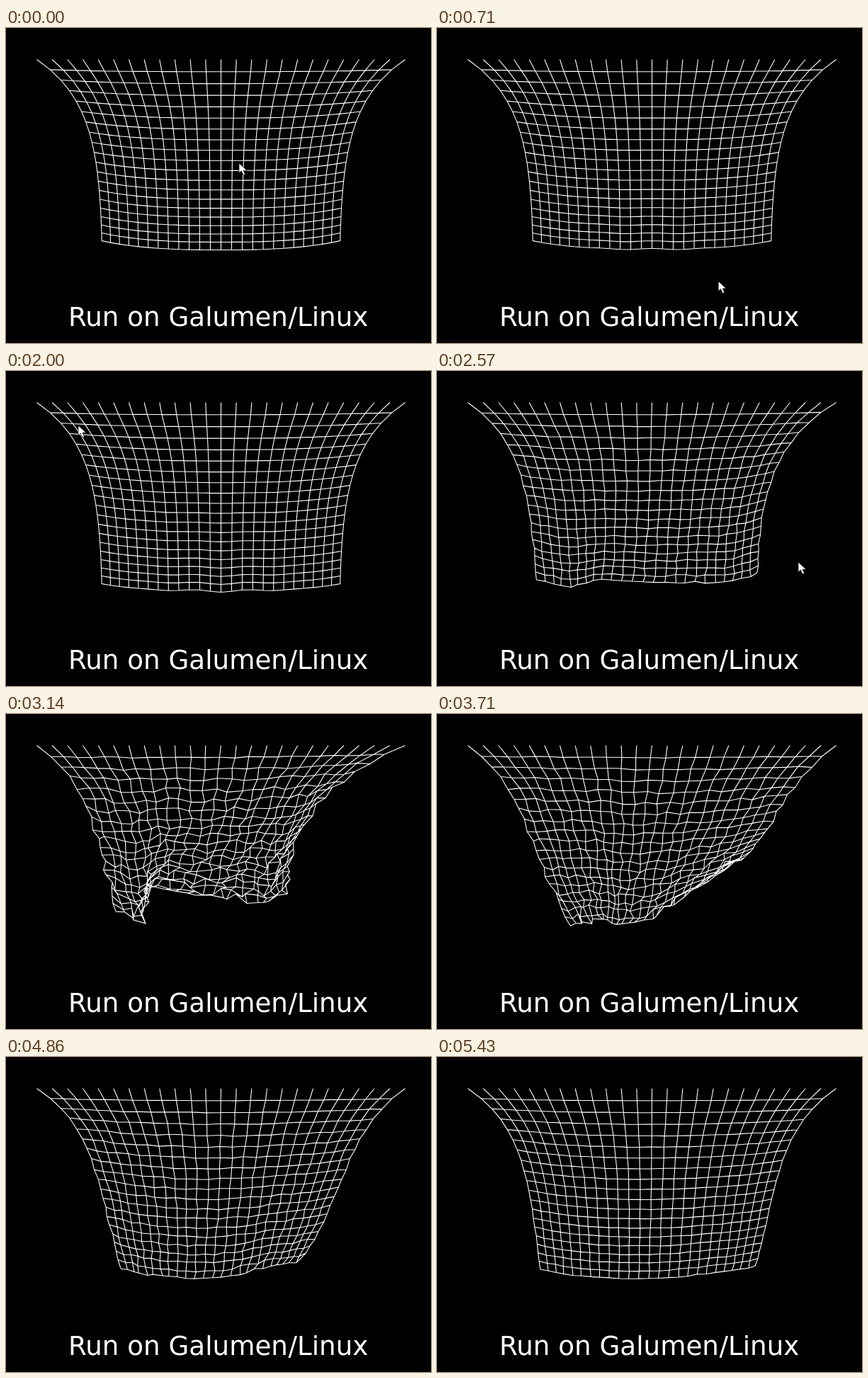
Write an HTML page with a canvas that moves like this. It is 600 px wide and 445 px high and loops after 5570 ms.

```html
<!DOCTYPE html>
<html lang="en">
<head>
<meta charset="utf-8">
<title>Cloth simulation</title>
<style>
  html, body { margin: 0; width: 100%; height: 100%; overflow: hidden; background: #000; }
  canvas, svg { position: absolute; left: 0; top: 0; width: 600px; height: 445px; }
  text { font: 37.25px "DejaVu Sans", Verdana, sans-serif; fill: #fff; }
</style>
</head>
<body>
<canvas id="cloth" width="600" height="445"></canvas>
<svg viewBox="0 0 600 445">
  <text x="88" y="421">Run on Galumen</text>
  <text x="511.4" y="421" text-anchor="end">/Linux</text>
  <path id="cursor" fill="#fff" stroke="#000" stroke-width=".7"
    d="M0 0V14L3.4 11L6 17L8.6 15.8L6.1 10.2H11Z"/>
</svg>
<script>
const LOOP = 5570, STEP = 1000 / 7, LAST = 38;
const COLS = 24, ROWS = 19;
const ctx = document.getElementById('cloth').getContext('2d');
const cursor = document.getElementById('cursor');
const mix = (a, b, p) => a + (b - a) * p;

// The cloth at rest, hanging from its pinned top row; s and v run from 0 to 1.
function rest(s, v) {
  const u = 2 * s - 1, r = v * ROWS;
  const half = r ? 167 + 93 * Math.exp(-r / 4.4) : 260;
  const k = 0.07 * (1 - Math.exp(-r));
  const drop = 13 * (1 - Math.exp(-r / 4)) * Math.abs(u) ** 2.5;
  return [303 + half * (u * (1 + k) - k * u ** 3), 44 + 17.4 * r - 0.1706 * r * r - drop];
}

// Catmull-Rom through evenly spaced values, ends extended straight.
function spline(vals, s) {
  const n = vals.length - 1, t = s * n, i = Math.min(n - 1, Math.floor(t)), f = t - i;
  const b = vals[i], c = vals[i + 1];
  const a = i ? vals[i - 1] : 2 * b - c;
  const d = i + 2 <= n ? vals[i + 2] : 2 * c - b;
  return b + 0.5 * f * (c - a + f * (2 * a - 5 * b + 4 * c - d + f * (3 * (b - c) + d - a)));
}

// Parabola from 0 through the middle value to the end value.
const bow = (mid, end, v) => v * (4 * mid - end) + v * v * (2 * end - 4 * mid);

function jitter(c, r, seed) {
  const n = Math.sin(c * 12.9898 + r * 78.233 + seed * 37.719) * 43758.5453;
  return 2 * (n - Math.floor(n)) - 1;
}

function grid(place) {
  const out = [];
  for (let r = 0; r <= ROWS; r++)
    for (let c = 0; c <= COLS; c++) out.push(place(c / COLS, r / ROWS, c, r));
  return out;
}

// A soft wave around the middle column.
const ripple = (amp, lift) => grid((s, v) => {
  const [x, y] = rest(s, v), u = 2 * s - 1;
  return [x, y + v * v * (amp * Math.cos(u * 14) * Math.exp(-6 * u * u) - lift * (1 - u * u))];
});

// Pulls the hem and the middle of both sides to given points and spreads the shift
// inwards: `reach` sets how fast it fades upwards, `rough` how much the net crumples.
function drag({ left, right, hem, reach, rough }) {
  const axes = [0, 1].map(i => {
    const off = (p, s, v) => p[i] - rest(s, v)[i];
    return {
      hem: hem.map((p, j) => off(p, j / (hem.length - 1), 1)),
      left: off(left, 0, 0.5),
      right: off(right, 1, 0.5)
    };
  });
  return grid((s, v, c, r) => {
    const rise = v ** reach, wl = (1 - s) ** 3, wr = s ** 3;
    const crumple = rough * Math.min(1, r / 3) * (0.5 + 0.5 * v * v);
    return rest(s, v).map((p, i) => {
      const a = axes[i], first = a.hem[0], last = a.hem[a.hem.length - 1];
      return p + rise * spline(a.hem, s)
        + wl * (bow(a.left, first, v) - rise * first)
        + wr * (bow(a.right, last, v) - rise * last)
        + jitter(c, r, i + 1) * crumple;
    });
  });
}

const still = grid(rest);

const swept = drag({
  left: [131, 179], right: [419, 157], reach: 1.8, rough: 6,
  hem: [[155, 273], [192, 291], [203, 246], [258, 256], [315, 256], [365, 270], [400, 243]]
});
const falling = drag({
  left: [137, 184], right: [464, 164], reach: 1, rough: 4,
  hem: [[188, 295], [230, 292], [272, 297], [335, 268], [410, 210]]
});
const settling = drag({
  left: [135, 176], right: [465, 175], reach: 1.5, rough: 3,
  hem: [[178, 295], [222, 309], [285, 312], [345, 290], [382, 279]]
});

const linear = p => p;
const smooth = p => p * p * (3 - 2 * p);

// [step, pose, easing towards this pose]; the loop restarts just before full rest.
const poses = [
  [0, still],
  [9, ripple(-2, 2), linear],
  [14, ripple(2, 3), linear],
  [16, still, linear],
  [22, swept, smooth],
  [26, falling, linear],
  [30, settling, linear],
  [40.6, still, linear]
];

// Pointer trails: [step, x, y]; hidden outside them.
const trails = [
  [[0, 329, 191], [4, 420, 402], [9, 306, 181], [14, 102, 77], [16, 68, 62],
   [18, 510, 270], [20, 430, 402]],
  [[29, 392, 389], [31, 380, 375]]
];

function span(keys, n) {
  let i = 1;
  while (i < keys.length - 1 && keys[i][0] < n) i++;
  const a = keys[i - 1], b = keys[i];
  return [a, b, (n - a[0]) / (b[0] - a[0])];
}

function drawCloth(n) {
  const [a, b, raw] = span(poses, n), p = b[2](raw);
  const pts = a[1].map(([x, y], i) => [mix(x, b[1][i][0], p), mix(y, b[1][i][1], p)]);
  const line = (from, gap, count) => {
    for (let i = 0; i <= count; i++) {
      const [x, y] = pts[from + i * gap];
      i ? ctx.lineTo(x + 0.5, y + 0.5) : ctx.moveTo(x + 0.5, y + 0.5);
    }
  };
  ctx.fillStyle = '#000';
  ctx.fillRect(0, 0, 600, 445);
  ctx.strokeStyle = '#fff';
  ctx.lineWidth = 1.1;
  ctx.beginPath();
  for (let r = 1; r <= ROWS; r++) line(r * (COLS + 1), 1, COLS);
  for (let c = 0; c <= COLS; c++) line(c, COLS + 1, ROWS);
  ctx.stroke();
}

function drawCursor(n) {
  const trail = trails.find(t => n >= t[0][0] && n <= t[t.length - 1][0]);
  cursor.style.display = trail ? '' : 'none';
  if (!trail) return;
  const [a, b, p] = span(trail, n);
  cursor.setAttribute('transform', `translate(${mix(a[1], b[1], p)} ${mix(a[2], b[2], p)})`);
}

let shown = -1;
const start = performance.now();
function tick() {
  const t = (performance.now() - start) % LOOP;
  const n = Math.min(LAST, Math.floor((t + 4) / STEP));
  if (n !== shown) {
    shown = n;
    drawCloth(n);
    drawCursor(n);
  }
  requestAnimationFrame(tick);
}
tick();
</script>
</body>
</html>
```
